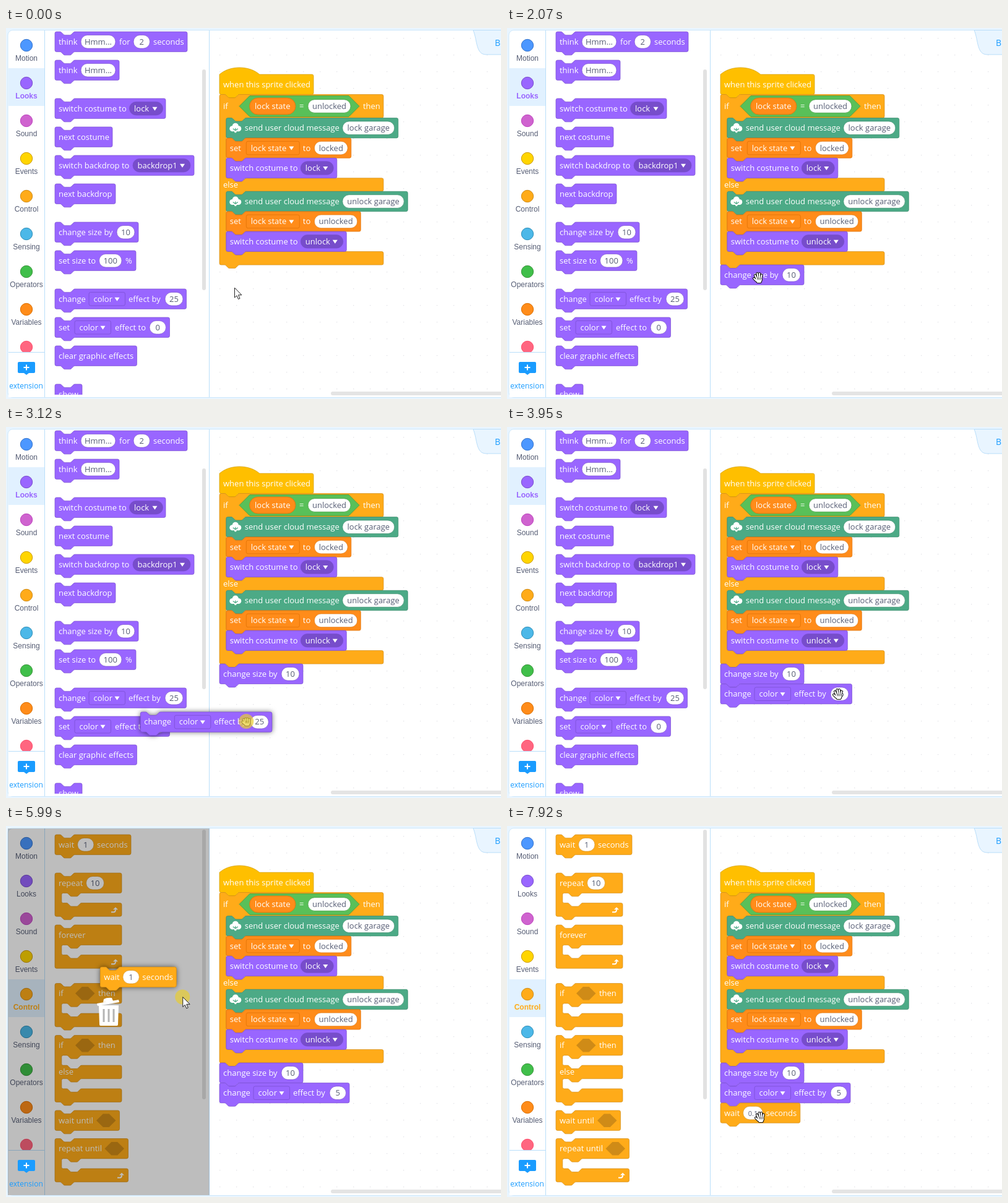
An HTML page with a canvas for the animation above (8 s loop, 800 by 600 pixels).

```html
<!DOCTYPE html>
<html lang="en">
<head>
<meta charset="utf-8">
<title>Block editor</title>
<style>
html, body { margin: 0; width: 100%; height: 100%; overflow: hidden; background: #fff; }
canvas { display: block; }
</style>
</head>
<body>
<canvas id="stage" width="800" height="600"></canvas>
<script>
const ctx = document.getElementById('stage').getContext('2d');
const LOOP = 8000, S = 0.675, ROW = 48 * S;
const UI = '"Open Sans", "Noto Sans", sans-serif', LABEL = '"Liberation Sans", Arial, sans-serif';
const INK = '#575e75', EDGE = '#b9defa', BLUE = '#1a9cff';
const COLORS = {
  looks: ['#9966ff', '#774dcb'], control: ['#ffab19', '#cf8b17'], events: ['#ffbf00', '#cc9900'],
  data: ['#ff8c1a', '#db6e00'], operators: ['#59c059', '#389438'], cloud: ['#4caa86', '#3a8a6b']
};
const CATEGORIES = [
  ['Motion', '#4c97ff', '#3373cc'], ['Looks', '#9966ff', '#774dcb'], ['Sound', '#cf63cf', '#bd42bd'],
  ['Events', '#ffd500', '#cc9900'], ['Control', '#ffab19', '#cf8b17'], ['Sensing', '#4cb8e8', '#2e8eb8'],
  ['Operators', '#40bf4a', '#389438'], ['Variables', '#ff8c1a', '#db6e00'], ['', '#ff6680', '#ff4d6a']
];

// Basic drawing helpers
function paint(path, fill, stroke, width = 1) {
  if (fill) { ctx.fillStyle = fill; ctx.fill(path); }
  if (stroke) { ctx.strokeStyle = stroke; ctx.lineWidth = width; ctx.stroke(path); }
}
function at(x, y, draw) {
  ctx.save();
  ctx.translate(x, y);
  draw();
  ctx.restore();
}
function text(s, x, y, color = '#fff', font = '13px ' + UI, align = 'left') {
  ctx.font = font;
  ctx.textAlign = align;
  ctx.fillStyle = color;
  ctx.fillText(s, x, y);
}
function rect(x, y, w, h, color) { ctx.fillStyle = color; ctx.fillRect(x, y, w, h); }
function round(x, y, w, h, r, fill, stroke) {
  const p = new Path2D();
  p.roundRect(x, y, w, h, r);
  paint(p, fill, stroke, S);
}
function disc(x, y, r, fill, stroke) {
  const p = new Path2D();
  p.arc(x, y, r, 0, 7);
  paint(p, fill, stroke);
}
function hexagon(x, cy, w, h, fill, stroke) {
  const r = h / 2;
  at(x, cy, () => paint(new Path2D(`M0 0L${r} ${-r}H${w - r}L${w} 0L${w - r} ${r}H${r}z`), fill, stroke, S));
}

// Parts inside a block; each one is drawn from the block's left edge and row centre
const T = (dx, s, dy = 0) => (x, cy) => text(s, x + dx, cy + dy + 4.4);
const O = (dx, w, s, size = 13) => (x, cy, c) => {
  round(x + dx, cy - 10.8, w, 21.6, 10.8, '#fff', c[1]);
  text(s, x + dx + w / 2, cy + 4.4, INK, size + 'px ' + UI, 'center');
};
const drop = (dx, w, s, r, filled) => (x, cy, c) => {
  round(x + dx, cy - 10.8, w, 21.6, r, c[filled ? 1 : 0], c[1]);
  text(s, x + dx + 7.5, cy + 4.4);
  at(x + dx + w - 13, cy, () => paint(new Path2D('M-4-2.5h8l-4 6z'), '#fff'));
};
const D = (dx, w, s) => drop(dx, w, s, 2.7, false);
const P = (dx, w, s) => drop(dx, w, s, 10.8, true);
const H = dx => (x, cy, c) => hexagon(x + dx, cy, 31.5, 21.6, c[1]);
const loopArrow = (dx, dy) => (x, cy) => at(x + dx, cy + dy, () => {
  paint(new Path2D('M-5 3h4q3 0 3-4'), null, '#fff', 2);
  paint(new Path2D('M-2-1l4-4 4 4z'), '#fff');
});
const cloudIcon = (x, cy, c) => at(x + 15, cy, () => {
  disc(-5, 1, 4.5, '#fff');
  disc(0, -3, 5, '#fff');
  disc(5, 1, 4.5, '#fff');
  rect(-5, 0, 10, 5.5, '#fff');
  paint(new Path2D('M0 8V0M0 4L-4 1M0 4L4 1'), null, c[0], 1.3);
  disc(0, 6, 1.8, '#fff');
});

const NOTCH = 'c2 0 3 1 4 2l4 4c1 1 2 2 4 2h12c2 0 3-1 4-2l4-4c1-1 2-2 4-2';
const TAB = 'c-2 0-3 1-4 2l-4 4c-1 1-2 2-4 2h-12c-2 0-3-1-4-2l-4-4c-1-1-2-2-4-2';

// rows alternates arm and mouth heights, in block units
function outline(w, rows, { hat, noTab }) {
  const right = `H${w / S - 4}a4 4 0 0 1 4 4`;
  let d = (hat ? 'M0 0c25-22 71-22 96 0' : `M0 4a4 4 0 0 1 4-4h8${NOTCH}`) + `${right}v${rows[0] - 8}a4 4 0 0 1-4 4`;
  for (let i = 1; i < rows.length; i += 2) {
    d += `H64${TAB}h-8a4 4 0 0 0-4 4v${rows[i] - 8}a4 4 0 0 0 4 4h8${NOTCH}`
      + `${right}v${rows[i + 1] - 8}a4 4 0 0 1-4 4`;
  }
  return new Path2D(d + (noTab ? '' : 'H48' + TAB) + 'H4a4 4 0 0 1-4-4z');
}
function block(x, y, kind, w, parts, rows = [48], options = {}) {
  const c = COLORS[kind];
  at(x, y, () => {
    ctx.scale(S, S);
    const shape = outline(w, rows, options);
    if (options.lifted) {
      ctx.shadowColor = 'rgba(0,0,0,.6)';
      ctx.shadowBlur = 8;
      paint(shape, c[0]);
      ctx.shadowColor = 'transparent';
    }
    paint(shape, c[0], c[1]);
  });
  for (const part of parts) part(x, y + rows[0] * S / 2, c);
}

const sizeParts = [T(6, 'change size by'), O(100, 29, '10')];
const colorParts = (value, w) => [T(6, 'change'), D(55, 58.5, 'color'), T(119, 'effect by'), O(178, w, value)];
const waitParts = (value, w = 26.5, size = 13) =>
  [T(6, 'wait'), O(36.5, w, value, size), T(41.5 + w, 'seconds')];

const LOOP_ROWS = [48, 24, 32];
const PALETTES = {
  looks: [
    [6, 214, [T(6, 'think'), O(42, 56, 'Hmm...'), T(104, 'for'), O(127, 26.5, '2'), T(159, 'seconds')]],
    [52, 104, [T(6, 'think'), O(42, 56, 'Hmm...')]],
    [114, 179, [T(6, 'switch costume to'), P(120.5, 54, 'lock')]],
    [160, 93, [T(6, 'next costume')]],
    [206, 225, [T(6, 'switch backdrop to'), P(126, 93, 'backdrop1')]],
    [252, 98, [T(6, 'next backdrop')]],
    [314, 135, sizeParts],
    [360, 131, [T(6, 'set size to'), O(71.5, 36.5, '100'), T(114, '%')]],
    [422, 212.5, colorParts('25', 29)],
    [468, 185.5, [T(6, 'set'), D(32, 58.5, 'color'), T(97, 'effect to'), O(153, 26.5, '0')]],
    [514, 132.5, [T(6, 'clear graphic effects')]],
    [576, 44, [T(6, 'show')]]
  ],
  control: [
    [14, 123, waitParts('1')],
    [76, 108, [T(6, 'repeat'), O(50.5, 29, '10'), loopArrow(96, 44)], LOOP_ROWS],
    [160, 108, [T(6, 'forever'), loopArrow(96, 44)], LOOP_ROWS, { noTab: true }],
    [254.5, 108, [T(6, 'if'), H(33), T(70, 'then')], LOOP_ROWS],
    [338.5, 108, [T(6, 'if'), H(33), T(70, 'then'), T(6, 'else', 43)], [48, 24, 32, 24, 32]],
    [460, 104.5, [T(6, 'wait until'), H(67)]],
    [505.5, 118.5, [T(6, 'repeat until'), H(80.5), loopArrow(106, 44)], LOOP_ROWS]
  ]
};

// Motion: [time, x, y]
const POINTER = [
  [80, 369, 420], [550, 162, 333], [720, 162, 333], [1200, 331, 413], [1510, 404, 409], [1790, 404, 409],
  [2070, 406, 404], [2330, 406, 404], [2680, 250, 438], [2760, 250, 438], [3120, 388, 476], [3500, 501, 437],
  [3680, 501, 437], [3950, 535, 432], [4800, 535, 432], [5160, 629, 508], [5260, 629, 508], [5480, 35, 275],
  [5610, 35, 275], [5760, 191, 32], [5840, 191, 32], [5990, 285, 276], [6360, 380, 450], [6610, 380, 450],
  [6830, 452, 472], [7020, 452, 472], [7300, 400, 466], [7840, 400, 466], [7920, 409, 471]
];
const SHAPES = [
  [0, 'arrow'], [450, 'open'], [720, 'closed'], [1600, 'open'], [2420, 'arrow'], [2640, 'open'],
  [2760, 'closed'], [3500, 'open'], [4850, 'arrow'], [5680, 'open'], [5840, 'arrow'], [6100, 'closed'], [6830, 'open']
];
const DRAGS = [
  { end: 1600, path: [[720, 79, 314], [1200, 248, 394], [1510, 321, 390]], kind: 'looks', w: 135, parts: sizeParts },
  { end: 3500, path: [[2760, 79, 422], [3120, 217, 461], [3490, 330, 421]], kind: 'looks', w: 212.5, parts: colorParts('25', 29) },
  { end: 6830, path: [[5840, 79, 14], [5990, 152, 227.5], [6360, 268, 432], [6610, 268, 432], [6800, 340, 455]],
    kind: 'control', w: 123, parts: waitParts('1') }
];
function follow(path, t) {
  const i = path.findIndex(p => p[0] > t);
  if (i < 1) return (i ? path[path.length - 1] : path[0]).slice(1);
  const [t0, x0, y0] = path[i - 1], [t1, x1, y1] = path[i], k = (t - t0) / (t1 - t0);
  return [x0 + (x1 - x0) * k, y0 + (y1 - y0) * k];
}
const latest = (steps, t) => steps.filter(s => s[0] <= t).pop()[1];

function drawWorkspace() {
  rect(0, 0, 800, 600, '#e9f5ff');
  round(3, 3.5, 820, 594, 8, '#fff', EDGE);
  for (let x = 345; x < 800; x += 27) {
    for (let y = 16; y < 586; y += 27) rect(x, y, 1.3, 1.3, '#e2e2e6');
  }
  paint(new Path2D('M755 3.5C762 20 759 43 776 43H802V3.5z'), '#e9f5ff', EDGE);
  text('Blocks', 790, 29, BLUE, '14px ' + UI);
  round(525, 588, 290, 6, 3, '#e4e4e4');
}
function drawSidebar(active) {
  CATEGORIES.forEach(([name, fill, stroke], i) => {
    const y = 28 + 61 * i, on = name.toLowerCase() === active;
    if (on) rect(4, y - 24, 58, 61, '#e1f1ff');
    disc(33, y, 9.7, fill, stroke);
    text(name, 33, y + 25, on ? fill : INK, (on ? 'bold ' : '') + '12px ' + LABEL, 'center');
  });
  rect(4, 524, 58, 73, '#fff');
  rect(4, 524, 58, 1, EDGE);
  rect(62, 4, 1, 593, EDGE);
  rect(328, 4, 1, 593, EDGE);
}
function drawPalette(kind) {
  ctx.save();
  ctx.beginPath();
  ctx.rect(63, 5, 265, 588);
  ctx.clip();
  for (const [y, ...rest] of PALETTES[kind]) block(79, y, kind, ...rest);
  ctx.restore();
  if (kind === 'looks') round(317, 67, 6, 357, 3, '#e2e2e2');
  else round(317, 6, 6, 436, 3, '#e2e2e2');
}
function drawTrash() {
  rect(3, 4, 325.5, 593, 'rgba(0,0,0,.26)');
  at(166, 300, () => {
    paint(new Path2D('M-16-10H16L15 21q0 2-2 2H-13q-2 0-2-2z'), '#fff');
    paint(new Path2D('M-8-4V17M0-4V17M8-4V17'), null, '#b4b4b4', 3);
    paint(new Path2D('M-19-13L16-19l1 4L-18-9zM-9-15l1-5q5-3 13-2l2 5'), '#fff');
  });
}
function drawExtension() {
  round(19, 540, 28, 18, 2, BLUE);
  paint(new Path2D('M29 558h8l-4 3z'), BLUE);
  paint(new Path2D('M33 544.500v9M28.500 549h9'), null, '#fff', 2);
  text('extension', 32.5, 583, BLUE, '12px ' + UI, 'center');
}
function drawBranch(y, message, messageW, state, stateW, costume, costumeW) {
  const x = 345 + 16 * S;
  block(x, y, 'cloud', messageW + 194, [cloudIcon, T(30, 'send user cloud message'), O(188, messageW, message)]);
  block(x, y + ROW, 'data', stateW + 148, [T(6, 'set'), D(32.5, 86, 'lock state'), T(124, 'to'), O(142.5, stateW, state)]);
  block(x, y + 2 * ROW, 'looks', costumeW + 126, [T(6, 'switch costume to'), P(120.5, costumeW, costume)]);
}
function drawScript(t) {
  const x = 345;
  block(x, 75.1, 'events', 152, [T(6, 'when this sprite clicked')], [48], { hat: true });
  block(x, 107.5, 'control', 265, [T(6, 'if'), T(232, 'then'), T(6, 'else', 127)], [56.3, 144, 32, 144, 32]);
  const ops = COLORS.operators, data = COLORS.data;
  hexagon(377, 126.5, 194, 34, ops[0], ops[1]);
  round(393.5, 113, 74.5, 27, 13.5, data[0], data[1]);
  T(402, 'lock state')(0, 126.5);
  T(474, '=')(0, 126.5);
  O(488, 69, 'unlocked')(0, 126.5, ops);
  drawBranch(145.5, 'lock garage', 84, 'locked', 54, 'lock', 53);
  drawBranch(264.3, 'unlock garage', 99.5, 'unlocked', 69.5, 'unlock', 68.5);

  if (t >= 1600) block(x, 383.1, 'looks', 135, sizeParts);
  if (t >= 3500) {
    const value = latest([[0, '25'], [4350, ''], [4440, '5']], t), w = t < 4800 ? 29 : 26.5;
    block(x, 383.1 + ROW, 'looks', w + 183.5, colorParts(value, w));
  }
  if (t >= 6830) {
    const value = latest([[0, '1'], [7400, ''], [7480, '0'], [7560, '0.'], [7640, '0.1']], t);
    const w = t < 7840 ? 26.5 : 32;
    block(x, 383.1 + 2 * ROW, 'control', w + 96.8, waitParts(value, w, t < 7400 ? 13 : 11));
  }
}
function drawPointer(x, y, shape) {
  at(x, y, () => {
    ctx.lineJoin = ctx.lineCap = 'round';
    if (shape === 'arrow') {
      paint(new Path2D('M0.500 0.500V16L4 12.800 6.500 18.500 9 17.400 6.500 11.800H11.500z'), '#fff', '#222');
      return;
    }
    const hand = new Path2D(shape === 'open'
      ? 'M-5-4L-2 3M-1.500-7L0 3M2-7V3M5.500-4.500L4 3M-7 1L-3 5M-3 3H5L3.500 7H-1z'
      : 'M-4-3L-3 3M-1-4V3M2-4V3M5-3V3M-6 1L-3 4M-3 3H5L3.500 6H-1z');
    paint(hand, null, '#111', 4.2);
    paint(hand, '#fff', '#fff', 2.1);
    paint(new Path2D('M-1 0V3M1.200 0V3M3.400 0V3'), null, '#111', 0.7);
  });
}

function frame(now) {
  const t = now % LOOP;
  const [x, y] = follow(POINTER, t), shape = latest(SHAPES, t);
  const drag = DRAGS.find(d => t >= d.path[0][0] && t < d.end);
  const tab = t < 5500 ? 'looks' : 'control';
  drawWorkspace();
  drawSidebar(tab);
  drawPalette(tab);
  if (drag && x < 335) drawTrash();
  drawExtension();
  drawScript(t);
  if (drag) block(...follow(drag.path, t), drag.kind, drag.w, drag.parts, [48], { lifted: true });
  const halo = () => disc(x, y, 12, 'rgba(232,205,50,.7)');
  if (drag && shape === 'arrow') halo();
  drawPointer(x, y, shape);
  if (drag && shape === 'closed') halo();
  requestAnimationFrame(frame);
}
requestAnimationFrame(frame);
</script>
</body>
</html>
```
